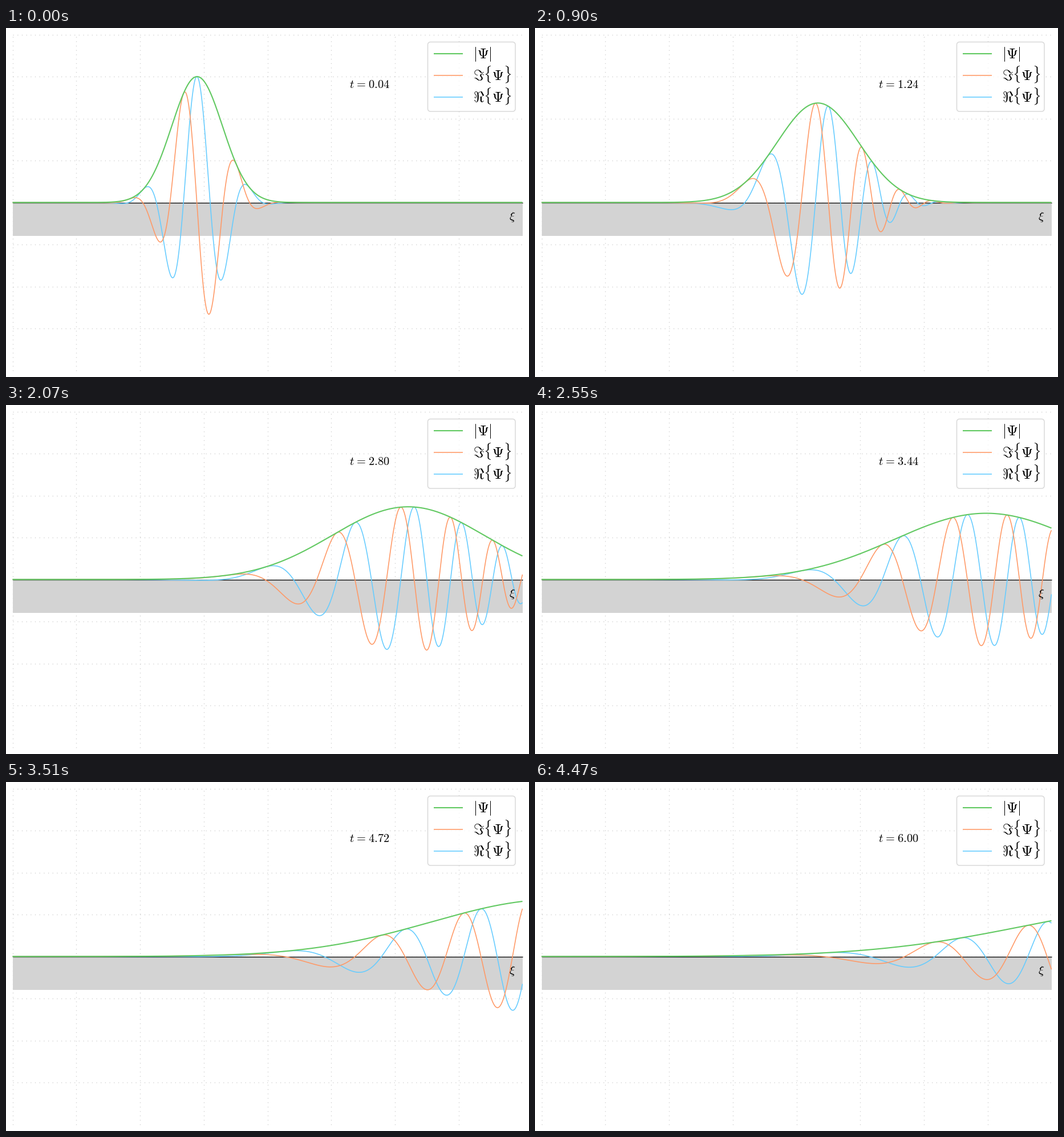
A matplotlib script for the animation above (5400 ms loop, 917x611 px).

```python
import numpy as np
import matplotlib.pyplot as plt
from matplotlib.animation import FuncAnimation
from matplotlib.patches import FancyBboxPatch, Rectangle

plt.rcParams["mathtext.fontset"] = "cm"

W, H, DPI = 917, 611, 100
LEFT, RIGHT, TOP, BOTTOM = 11.5, 905.5, 11.5, 599.5
BASE = (TOP + BOTTOM) / 2
UNIT = (RIGHT - LEFT) / 20      # pixels per length unit
HEIGHT = 3 * (BOTTOM - TOP) / 8  # initial peak height in pixels
K0, SPREAD, START, PHASE = 3.0, 0.99, 329.7, 0.13
STEPS, HOLD, DT = 150, 30, 0.04

GREEN, ORANGE, BLUE = "#62c962", "#ff9966", "#66ccff"


def pt(px):
    return px * 72 / DPI


def packet(x, t):
    """Free Gaussian wave packet, phase running as exp(i(wt - kx))."""
    s = 1 + 1j * t / SPREAD
    d = x - K0 * t
    psi = np.exp(-d**2 / (2 * SPREAD * s) + 1j * (K0 * x - K0**2 * t / 2)) / np.sqrt(s)
    return np.conj(psi) * np.exp(1j * PHASE)


fig = plt.figure(figsize=(W / DPI, H / DPI), dpi=DPI, facecolor="white")
ax = fig.add_axes([0, 0, 1, 1])
ax.set_xlim(0, W)
ax.set_ylim(H, 0)
ax.axis("off")


def line(x, y, color, px, z, **kw):
    return ax.plot(x, y, color=color, lw=pt(px), zorder=z,
                   solid_capstyle="butt", **kw)[0]


def label(x, y, text, px):
    return ax.text(x, y, text, fontsize=pt(px), color="black",
                   ha="left", va="baseline", zorder=8)


# Dotted grid, shaded band and axis line
dots = dict(linestyle=(0, (1, 5)), dash_capstyle="butt")
for n in range(8):
    gx = LEFT + n * (RIGHT - LEFT) / 8
    gy = TOP + n * (BOTTOM - TOP) / 8
    line([gx, gx], [BOTTOM, TOP], "#cccccc", 1.28, 0, **dots)
    line([LEFT, RIGHT], [gy, gy], "#cccccc", 1.28, 0, **dots)
ax.add_patch(Rectangle((LEFT, BASE), RIGHT - LEFT, 58.8, fc="#d3d3d3", lw=0, zorder=1))
line([LEFT, RIGHT], [BASE, BASE], "black", 1.3, 2)

# Curves
px = np.linspace(LEFT, RIGHT, 1200)
xs = (px - START) / UNIT
real = line(px, px, BLUE, 1.6, 3)
imag = line(px, px, ORANGE, 1.6, 4)
modulus = line(px, px, GREEN, 2.1, 5)

# Legend
ax.add_patch(FancyBboxPatch((744.6, 29.6), 143.3, 111.4,
                            boxstyle="round,pad=5.1,rounding_size=5.1",
                            fc=(1, 1, 1, 0.8), ec=(0.8, 0.8, 0.8, 0.8),
                            lw=pt(1.4), zorder=6))
rows = [(r"$|\Psi|$", GREEN, 2.1),
        (r"$\Im\{\Psi\}$", ORANGE, 1.6),
        (r"$\Re\{\Psi\}$", BLUE, 1.6)]
for n, (text, color, width) in enumerate(rows):
    y = 44.5 + 38.2 * n
    line([749.7, 800.7], [y, y], color, width, 7)
    label(819, y + 8.5, text, 25.5)

label(882.5, 336, r"$\xi$", 20.4)
clock = label(602, 105, "", 20.4)


def update(i):
    t = DT * (min(i, STEPS - 1) + 1)
    psi = packet(xs, t)
    for curve, values in ((real, psi.real), (imag, psi.imag), (modulus, abs(psi))):
        curve.set_ydata(BASE - HEIGHT * values)
    clock.set_text(rf"$t\hspace{{0.08}}=\hspace{{0.08}}{t:.2f}$")
    return real, imag, modulus, clock


anim = FuncAnimation(fig, update, frames=STEPS + HOLD, interval=30,
                     init_func=lambda: update(0), repeat=True, repeat_delay=0)
plt.show()
```
